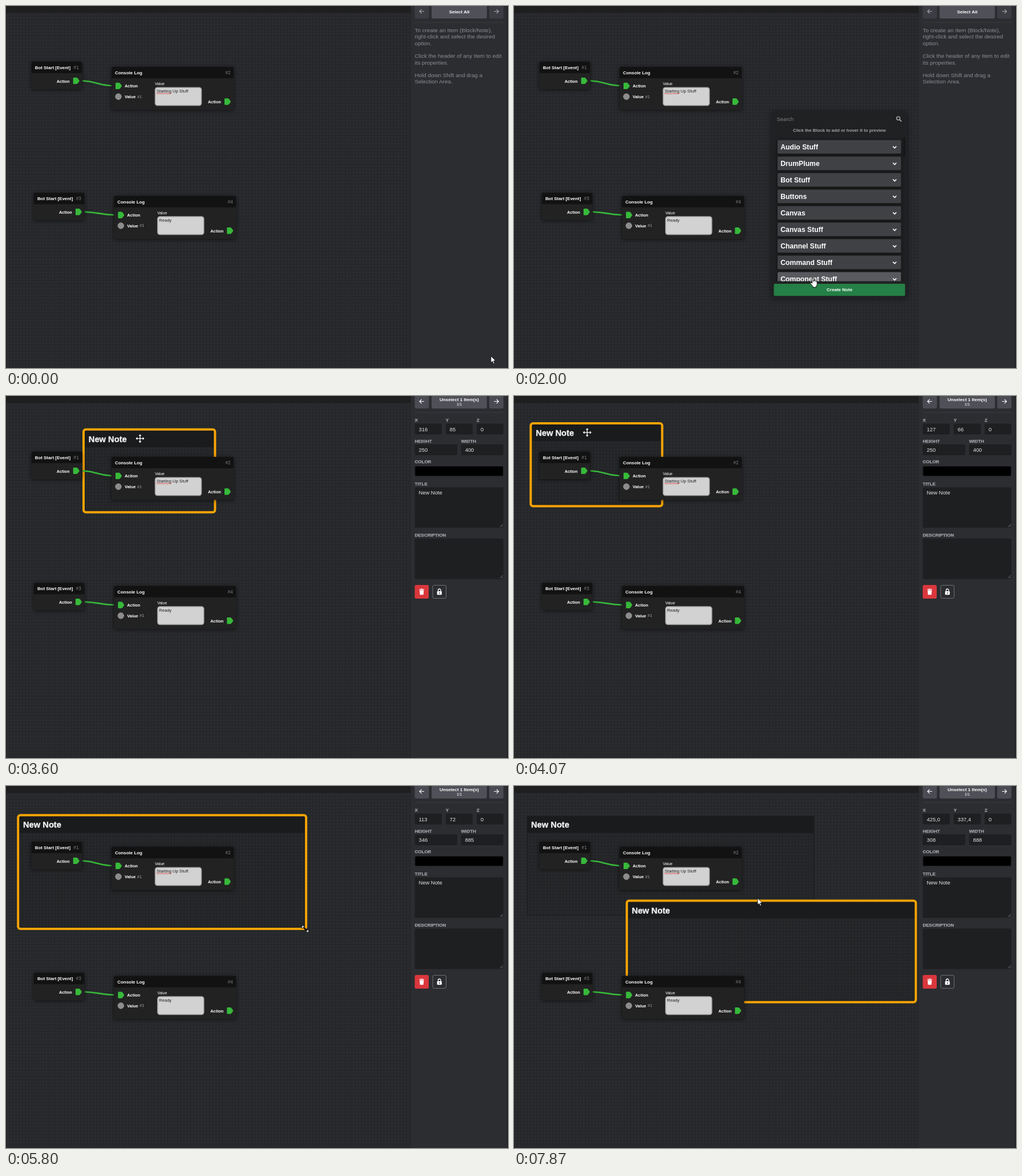
Write an HTML page that moves like this. It is 880 by 636 pixels and loops after 8 s.

```html
<!DOCTYPE html>
<html lang="en">
<head>
<meta charset="utf-8">
<title>Block editor</title>
<style>
html, body { margin: 0; width: 100%; height: 100%; overflow: hidden; background: #27292c; }
svg { display: block; width: 880px; height: 636px; font-family: "Liberation Sans", Arial, sans-serif; }
text { white-space: pre; }
.b { font-weight: 700; }
.shade { filter: drop-shadow(0 1px 3px rgba(0, 0, 0, .6)); }
</style>
</head>
<body>
<svg id="stage" viewBox="0 0 880 636"></svg>
<script>
const LOOP = 8000, STEP = 1000 / 15, ZOOM = 0.566;
const ORIGIN = { x: 23.2, y: 53.3, noteX: 113, noteY: 72 };
const GREEN = '#37b93a';
const MENU_AT = 800, CONTENT_AT = 1000, NOTE_AT = 2530, PASTE_AT = 7730;

const rect = (x, y, w, h, fill, rx = 0, more = '') =>
  `<rect x="${x}" y="${y}" width="${w}" height="${h}" rx="${rx}" fill="${fill}" ${more}/>`;
const text = (x, y, size, fill, str, more = '') =>
  `<text x="${x}" y="${y}" font-size="${size}" fill="${fill}" ${more}>${str}</text>`;
const line = (d, color, width, more = '') =>
  `<path d="${d}" fill="none" stroke="${color}" stroke-width="${width}" ${more}/>`;
const group = (id, body, more = '') => `<g id="${id}" ${more}>${body}</g>`;
const BOLD = 'class="b"', MID = 'class="b" text-anchor="middle"';

// Blocks
const port = (x, y) =>
  `<path d="M${x} ${y - 4.5}q0-1.2 1.2-1.2h4.6q1.2 0 2 1l2.8 3.7q.7 1 0 2l-2.8 3.7q-.8 1-2 1h-4.6q-1.2 0-1.2-1.2z" fill="${GREEN}"/>`;
const frame = (w, h, title, num) => `<g class="shade">${rect(0, 0, w, h, '#222223', 2)}</g>`
  + rect(0, 0, w, 20, '#121213', 2)
  + text(6, 13, 7.92, '#fff', title, BOLD)
  + text(w - 5.5, 13, 8.2, '#7d7d80', num, 'text-anchor="end"');
const at = (x, y, body) => `<g transform="translate(${x} ${y})">${body}</g>`;

const startBlock = (x, y, num) => at(x, y, frame(88.5, 48, 'Bot Start [Event]', num)
  + text(44, 36.5, 7.36, '#fff', 'Action', BOLD) + port(73, 33.4));

const squiggle = () => {
  let d = 'M79 47.6';
  for (let i = 0; i < 13; i++) d += `l1 ${i % 2 ? 1.4 : -1.4}l1 0`;
  return line(d, '#e03030', 0.8);
};
const logBlock = (x, y, num, value, wavy) => at(x, y, frame(214, 75.5, 'Console Log', num)
  + port(7, 33.4) + text(23, 36, 7.36, '#fff', 'Action', BOLD)
  + '<circle cx="12" cy="52.2" r="5.2" fill="#8c8c8c" stroke="#a0a0a0" stroke-width=".8"/>'
  + text(23, 55, 7.36, '#fff', 'Value', BOLD) + text(45, 54.5, 7.2, '#a5a5a8', '#1')
  + text(76, 32, 6.8, '#fff', 'Value')
  + rect(76.5, 36.2, 81, 31.6, '#d2d2d2', 4, 'stroke="#a2a2a2" stroke-width="1.5"')
  + text(79, 45, 7.55, '#202020', value) + (wavy ? squiggle() : '')
  + text(169, 64, 7.36, '#fff', 'Action', BOLD) + port(198, 61));
const wire = (x, y, w, h) =>
  line(`M${x} ${y}C${x + w * .5} ${y + 1} ${x + w * .5} ${y + h - 1} ${x + w} ${y + h}`, GREEN, 2.6, 'stroke-linecap="round"');

// Notes
const note = id => group(id,
  rect(0, 0, 1, 1, 'url(#grid)', 0, 'class="body"') + rect(0, 0, 1, 1, 'rgba(0,0,0,.08)', 0, 'class="body"')
  + rect(0, 0, 1, 29, '#1a1b1d', 0, 'class="head"')
  + rect(0, 0, 1, 1, 'none', 1, 'class="body edge" stroke="#18191b"')
  + rect(-2, -2, 1, 1, 'none', 4, 'class="ring" stroke="#f6a406" stroke-width="4"')
  + text(6.8, 20, 14.7, '#f2f2f2', 'New Note', 'class="b title" stroke="#f2f2f2" stroke-width=".35"'));

// Menu
const ROWS = ['Audio Stuff', 'DrumPlume', 'Bot Stuff', 'Buttons', 'Canvas', 'Canvas Stuff',
  'Channel Stuff', 'Command Stuff', 'Component Stuff'];
const row = (name, i) => {
  const y = 235.5 + 29 * i;
  return `<g class="shade">${rect(462, y, 216.5, 24, '#404145', 2, 'class="row"')}</g>`
    + text(467.3, y + 16, 12.2, '#fff', name, BOLD)
    + line(`M664.3 ${y + 11}l3 3 3-3`, '#fff', 1.7);
};
const menu = () => group('menu',
  `<g style="filter:drop-shadow(0 0 4px rgba(0,0,0,.5))">${rect(452, 186, 237, 328, '#202122', 4)}</g>`
  + group('content',
    text(460.5, 202, 9.4, '#7d8086', 'Search')
    + rect(460.3, 193.5, 1, 10.5, '#ddd', 0, 'id="caret"')
    + '<circle cx="673.6" cy="197.3" r="3" fill="none" stroke="#b5b6ba" stroke-width="1.3"/>'
    + line('M675.9 199.6l3.4 3.4', '#b5b6ba', 1.5)
    + text(570.5, 220.5, 7.82, '#a3a4a8', 'Click the Block to add or hover it to preview', MID)
    + `<g clip-path="url(#list)">${ROWS.map(row).join('')}</g>`
    + rect(682.5, 230.5, 3, 34, '#141416', 1.5, 'id="thumb"')
    + rect(455.5, 488, 230, 21.3, '#248046', 2)
    + text(570.6, 501.3, 8.05, '#fff', 'Create Note', MID)));

// Sidebar
const arrow = (x, dir, color) =>
  line(`M${x - 4 * dir} 9.5h${8 * dir}m${-3.6 * dir} -3.6l${3.6 * dir} 3.6l${-3.6 * dir} 3.6`, color, 1.2);
const topBar = (fill, color) => rect(716.5, -4, 25, 26, fill, 3) + rect(847, -4, 25, 26, fill, 3)
  + rect(746, -4, 97, 26, '#4f5058', 3) + arrow(729, -1, color) + arrow(859.5, 1, color);
const HELP = [['To create an Item (Block/Note),', 46], ['right-click and select the desired', 57.3], ['option.', 68.6],
  ['Click the header of any Item to edit', 91.2], ['its properties.', 102.5],
  ['Hold down Shift and drag a', 125], ['Selection Area.', 136.3]];
const idle = () => group('idle', topBar('#3c3d43', '#a4a5aa')
  + text(794.5, 13, 8, '#fff', 'Select All', MID)
  + HELP.map(([s, y]) => text(716.5, y, 9.85, '#8b8d93', s)).join(''));

const label = (x, y, s) => text(x, y, 8, '#a4a6ac', s, 'class="b" stroke="#a4a6ac" stroke-width=".25"');
const field = (x, y, w, name, id) => label(x, y - 3.5, name) + rect(x, y, w, 19, '#1e1f21', 2)
  + text(x + 7, y + 13, 9.4, '#e6e6e8', '', `id="${id}"`);
const area = (y, name, value) => label(716.5, y - 4, name) + rect(716.5, y, 155.5, 71, '#1e1f21', 2)
  + text(723.5, y + 12.7, 9.4, '#e6e6e8', value)
  + line(`M866 ${y + 69.5}l5-5m-2 5l2-2`, '#8a8b8f', 0.8);
const props = () => group('props', topBar('#4a4b53', '#fff')
  + text(794.5, 9, 8.06, '#fff', 'Unselect 1 Item(s)', MID) + text(794.5, 17.3, 6.4, '#d0d0d4', '1/1', MID)
  + field(716.5, 48.5, 47.5, 'X', 'vx') + field(770.7, 48.5, 47.5, 'Y', 'vy') + field(825, 48.5, 47, 'Z', 'vz')
  + field(716.5, 85, 74.5, 'HEIGHT', 'vh') + field(797.7, 85, 74.3, 'WIDTH', 'vw')
  + label(716.5, 118.3, 'COLOR') + rect(717, 123.5, 154.5, 17, '#000', 2, 'stroke="#1c1d1f"')
  + area(160.5, 'TITLE', 'New Note') + area(250.5, 'DESCRIPTION', '')
  + rect(716.5, 332, 24.5, 24, '#da373c', 2.5)
  + '<path d="M725 341.2h7.4l-.6 7.2q0 .9-.9.9h-4.4q-.9 0-.9-.9zM724.6 339.2h2.4l.6-.8h2.2l.6.8h2.4v1.2h-8.2z" fill="#fff"/>'
  + rect(748, 332.5, 23.5, 23, 'none', 2.5, 'stroke="#6e6f75"')
  + rect(755.7, 343, 8.2, 6.3, '#fff', 1)
  + line('M757.5 343v-1.7a2.3 2.3 0 0 1 4.6 0v1.7', '#fff', 1.3)
  + '<circle cx="759.8" cy="346.2" r="1" fill="#2c2d31"/>');

// Cursors, drawn around their hot spots
const pointers = {
  arrow: '<path d="M0 0v11.8l2.7-2.5 1.9 4.3 2-.9-1.9-4.2h3.8z" fill="#fff" stroke="#000" stroke-width=".8"/>',
  hand: '<path d="M-1.3 1q0-1.3 1.2-1.3t1.2 1.3v5.2l.2-1.7q1.9-.5 2 .6 1.8-.5 2 .7 2-.4 2 1.2v3.4q0 2.6-1.6 4.3v1.4h-5.9v-1.4l-4-5.3q-.8-1.5.5-1.8 1-.2 2.4 1.6z" fill="#fff" stroke="#000" stroke-width=".9"/>',
  move: line('M-6.5 0h13M0-6.5v13', '#fff', 1.3)
    + '<path d="M-7.5 0l2.8-2.6v5.2zM7.5 0l-2.8-2.6v5.2zM0-7.5l-2.6 2.8h5.2zM0 7.5l-2.6-2.8h5.2z" fill="#fff"/>',
  resize: line('M-4-4L4 4', '#000', 2.6) + line('M-4-4L4 4', '#fff', 1.1, 'stroke-dasharray="2 7"')
    + '<path d="M-6-5.5h5l-5 5zM6 5.5h-5l5-5z" fill="#fff" stroke="#000" stroke-width=".7"/>',
};

const stage = document.getElementById('stage');
stage.innerHTML = `<defs>
  <pattern id="grid" width="5.66" height="5.66" patternUnits="userSpaceOnUse" y="12">
    ${rect(0, 0, 6, 6, '#292b2e')}${line('M0 .5H6M.5 0V6', '#222427', 1)}
  </pattern>
  <clipPath id="list">${rect(455, 230, 230, 253.5, '#000')}</clipPath></defs>`
  + rect(0, 0, 710, 636, 'url(#grid)') + rect(0, 0, 710, 12, '#1f1f20') + rect(0, 12, 1, 624, '#1f2022')
  + note('first') + note('second')
  + wire(135, 131.5, 49, 8.5) + wire(139, 361.8, 49, 5.2)
  + startBlock(44.7, 98, '#1') + logBlock(185, 107, '#2', 'Starting Up Stuff', true)
  + startBlock(48.9, 328.3, '#3') + logBlock(189.3, 333.8, '#4', 'Ready', false)
  + menu()
  + rect(709.5, 0, 171, 636, '#2c2d31') + rect(878.3, 0, 1.7, 636, '#1f2022')
  + rect(716.5, 28.5, 155.5, 1, '#3b3c41')
  + idle() + props()
  + group('cursor', Object.entries(pointers).map(([k, s]) => group(k, s)).join(''));

const $ = id => document.getElementById(id);
const show = (id, on) => { $(id).style.display = on ? '' : 'none'; };
const rows = [...document.querySelectorAll('.row')];

// Pointer path: time, x, y
const PATH = [
  [0, 850, 615], [70, 846, 610], [330, 690, 450], [600, 490, 225], [733, 450, 185], [1200, 450, 185],
  [1530, 478, 290], [1800, 515, 440], [2000, 524, 478], [2067, 525, 480], [2270, 550, 497], [2530, 556, 498],
  [2800, 557, 240], [2930, 556.5, 201], [3140, 556.5, 201], [3330, 460, 160], [3600, 235, 74.7],
  [3800, 160, 64], [4000, 131, 63], [4270, 120.2, 67.3], [4400, 150, 190], [4570, 225, 384],
  [4730, 246, 240], [4860, 250, 197], [5070, 250, 197], [5330, 450, 250], [5530, 521, 269.5], [5610, 521, 269.5],
  [5800, 524.5, 251.3], [6200, 526.2, 229.8], [6400, 526.2, 229.8], [6600, 490, 270], [6730, 470, 275],
  [7000, 330, 72], [7200, 330, 72], [7670, 427, 197], [8000, 427, 197],
];
const pointerAt = t => {
  const i = Math.max(1, PATH.findIndex(p => p[0] >= t));
  const [t0, x0, y0] = PATH[i - 1], [t1, x1, y1] = PATH[i], k = (t - t0) / (t1 - t0);
  return [x0 + (x1 - x0) * k, y0 + (y1 - y0) * k];
};
const clamp = (v, lo, hi) => Math.min(hi, Math.max(lo, v));

// The first note follows the pointer while dragged, then while resized.
const firstNote = t => {
  const [dx, dy] = pointerAt(clamp(t, 3140, 4270)), [rx, ry] = pointerAt(clamp(t, 5070, 6400));
  return {
    x: ORIGIN.noteX + (dx - 97 - ORIGIN.x) / ZOOM, y: ORIGIN.noteY + (dy - 14 - ORIGIN.y) / ZOOM,
    w: (rx - .4 - ORIGIN.x) / ZOOM, h: (ry - 2.2 - ORIGIN.y) / ZOOM,
  };
};
const PASTED = { x: 425, y: 337.4, w: 888, h: 308 };

const placeNote = (id, n, selected) => {
  const g = $(id), w = n.w * ZOOM, h = n.h * ZOOM;
  const x = ORIGIN.x + (n.x - ORIGIN.noteX) * ZOOM, y = ORIGIN.y + (n.y - ORIGIN.noteY) * ZOOM;
  const size = (sel, w, h) => g.querySelectorAll(sel).forEach(e => {
    e.setAttribute('width', w);
    if (h) e.setAttribute('height', h);
  });
  g.setAttribute('transform', `translate(${x} ${y})`);
  size('.body', w, h);
  size('.head', w);
  size('.ring', w + 4, h + 4);
  g.querySelector('.ring').style.display = selected ? '' : 'none';
};

const draw = time => {
  const t = Math.floor((time % LOOP + .5) / STEP) * STEP + .01;
  const [x, y] = pointerAt(t);
  const open = t >= MENU_AT && t < NOTE_AT, made = t >= NOTE_AT, pasted = t >= PASTE_AT;
  const selected = made && !(t >= 6666 && t < 7000);

  show('menu', open);
  show('content', t >= CONTENT_AT);
  show('caret', Math.floor((t - CONTENT_AT) / 533) % 2 === 0);
  show('thumb', t >= 1270);
  let over = open && y >= 488 && y < 510;
  rows.forEach((r, i) => {
    const top = 235.5 + 29 * i, hot = open && x > 462 && y >= top && y < Math.min(top + 24, 484);
    r.setAttribute('fill', hot ? '#595a5f' : '#404145');
    over = over || hot;
  });

  show('first', made);
  show('second', pasted);
  const n = firstNote(t);
  placeNote('first', n, selected && !pasted);
  placeNote('second', PASTED, true);

  show('idle', !selected);
  show('props', selected);
  const cur = pasted ? PASTED : n;
  $('vx').textContent = pasted ? '425,0' : Math.round(cur.x);
  $('vy').textContent = pasted ? '337,4' : Math.round(cur.y);
  $('vz').textContent = 0;
  $('vw').textContent = Math.round(cur.w);
  $('vh').textContent = Math.round(cur.h);

  const kind = over ? 'hand'
    : (t >= 3000 && t < 4300) || (t >= 7000 && t < 7260) ? 'move'
    : t >= 4800 && t < 6470 ? 'resize' : 'arrow';
  Object.keys(pointers).forEach(k => show(k, k === kind));
  $('cursor').setAttribute('transform', `translate(${x} ${y})`);
};

const start = performance.now();
const tick = () => {
  draw(performance.now() - start);
  requestAnimationFrame(tick);
};
tick();
</script>
</body>
</html>
```
